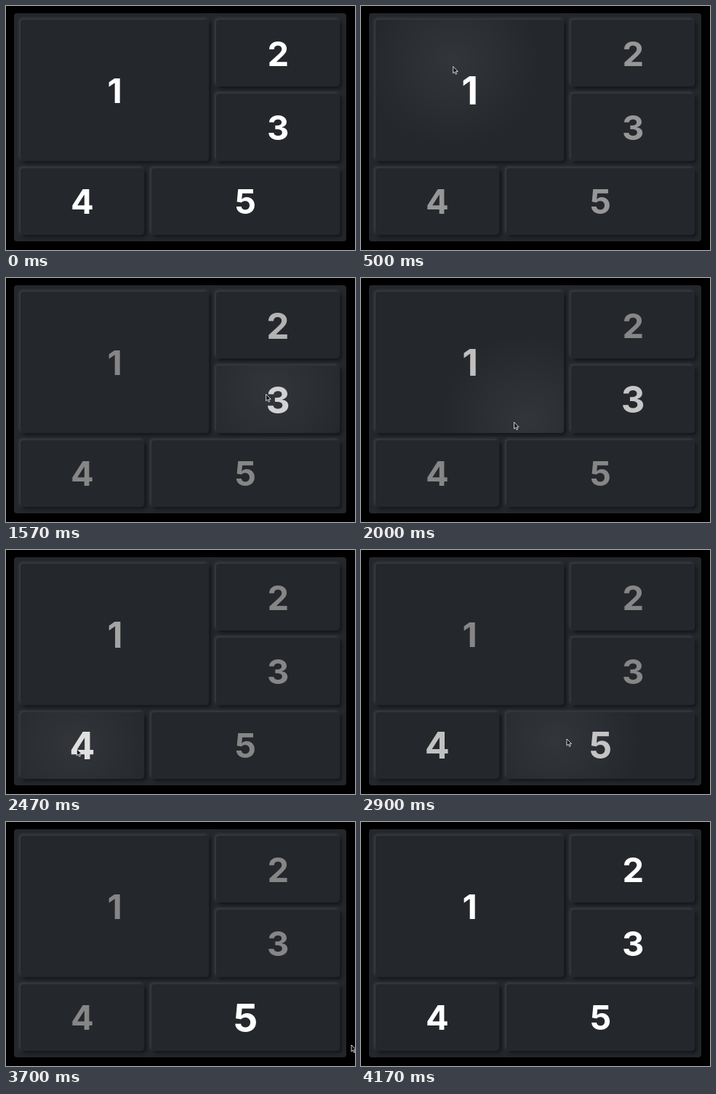
Write an HTML page that moves like this. It is 480 px wide and 337 px high and loops after 4.27 s.

```html
<!DOCTYPE html>
<html lang="en">
<head>
<meta charset="utf-8">
<title>Hover grid</title>
<style>
  html, body { margin: 0; width: 100%; height: 100%; overflow: hidden; background: #000; }
  .stage { position: relative; width: 480px; height: 337px; overflow: hidden; }
  .panel {
    position: absolute; left: 11px; top: 10px; width: 457px; height: 315px;
    box-sizing: border-box; padding: 9px; border-radius: 4px; background: #24272c;
    display: grid; gap: 10px;
    grid-template: repeat(3, 1fr) / repeat(5, 1fr);
  }
  .card {
    position: relative; grid-column: span 2;
    display: flex; align-items: center; justify-content: center;
    border-radius: 4px; background: #24282c;
    box-shadow: -2px -2px 4px rgba(255, 255, 255, .12), 3px 3px 5px rgba(0, 0, 0, .45);
  }
  .card:first-child { grid-area: span 2 / span 3; }
  .card:last-child { grid-column: span 3; }
  .glow {
    position: absolute; inset: 0; border-radius: 4px;
    background: radial-gradient(circle 120px at var(--x, 0) var(--y, 0), rgba(255, 235, 250, .065), rgba(255, 235, 250, 0));
  }
  .num { position: relative; font: 700 47px/1 Inter, sans-serif; }
  .pointer { position: absolute; left: 0; top: 0; overflow: visible; }
</style>
</head>
<body>
<div class="stage">
  <div class="panel"></div>
  <svg class="pointer" width="8" height="12">
    <path d="M0 0V9.2L2.1 7.2L3.5 10.5L5.1 9.8L3.7 6.7H6.6Z" fill="#111" stroke="#fff" stroke-width=".8"/>
  </svg>
</div>
<script>
const LOOP = 4270, FPS = 30, FADE = 500, LAG = 45;
const DIM = 134, GROW = .15, HALF_GAP = 5;

// Pointer key points: time, x, y
const path = [
  [130, 150, 5], [600, 140, 95], [1030, 355, 64], [1570, 357, 161], [2200, 140, 219],
  [2470, 98, 275], [2900, 283, 261], [3700, 475, 308], [3780, 500, 320]
];
const last = path.length - 1;

const panel = document.querySelector('.panel');
const pointer = document.querySelector('.pointer');

panel.innerHTML = [1, 2, 3, 4, 5]
  .map(n => `<div class="card"><div class="glow"></div><span class="num">${n}</span></div>`)
  .join('');
const cards = [...panel.children].map(el => ({
  box: el.getBoundingClientRect(), glow: el.firstChild, num: el.lastChild
}));

const onScreen = t => t >= path[0][0] && t < path[last][0];

// Smooth curve through the key points
function tip(t) {
  if (t <= path[0][0]) return path[0].slice(1);
  if (t >= path[last][0]) return path[last].slice(1);
  const i = path.findIndex(p => p[0] > t) - 1;
  const a = path[i], b = path[i + 1], d = b[0] - a[0], s = (t - a[0]) / d;
  const slope = (k, c) => {
    const p = path[Math.max(k - 1, 0)], n = path[Math.min(k + 1, last)];
    return (n[c] - p[c]) / (n[0] - p[0]) * d;
  };
  return [1, 2].map(c =>
    a[c] + (b[c] - a[c]) * s * s * (3 - 2 * s)
    + slope(i, c) * s * (1 - s) ** 2 - slope(i + 1, c) * s * s * (1 - s));
}

// Index of the card under the pointer, or -1; hover reacts slightly late
function hovered(t) {
  if (!onScreen(t - LAG)) return -1;
  const [x, y] = tip(t - LAG);
  return cards.findIndex(({ box }) =>
    x > box.left - HALF_GAP && x < box.right + HALF_GAP &&
    y > box.top - HALF_GAP && y < box.bottom + HALF_GAP);
}

// Every change of hovered card in one loop: [time, card]
const visits = [];
for (let t = 0, now = -1; t < LOOP; t += 5) {
  const card = hovered(t);
  if (card !== now) visits.push([t, now = card]);
}

// CSS "ease": cubic-bezier(.25, .1, .25, 1)
function ease(p) {
  if (p <= 0) return 0;
  if (p >= 1) return 1;
  const bez = (a, b, s) => 3 * (1 - s) ** 2 * s * a + 3 * (1 - s) * s * s * b + s ** 3;
  let lo = 0, hi = 1;
  for (let k = 0; k < 24; k++) {
    const mid = (lo + hi) / 2;
    if (bez(.25, .25, mid) < p) lo = mid; else hi = mid;
  }
  return bez(.1, 1, lo);
}

// Value at time t of a transition that each visit may redirect
function level(t, goal) {
  let from = goal(-1), to = from, since = 0;
  const at = time => from + (to - from) * ease((time - since) / FADE);
  for (const [time, card] of visits) {
    if (time > t) break;
    const next = +goal(card);
    if (next === to) continue;
    from = at(time);
    to = next;
    since = time;
  }
  return at(t);
}

function draw(t) {
  const active = hovered(t);
  const [gx, gy] = tip(t - LAG);
  cards.forEach(({ box, glow, num }, i) => {
    const size = level(t, card => +(card === i));
    const bright = level(t, card => +(card === i || card < 0));
    const v = Math.round(DIM + (255 - DIM) * bright);
    num.style.color = `rgb(${v},${v},${v})`;
    num.style.transform = `scale(${1 + GROW * size})`;
    glow.style.opacity = +(active === i);
    glow.style.setProperty('--x', `${gx - box.left}px`);
    glow.style.setProperty('--y', `${gy - box.top}px`);
  });
  const [x, y] = tip(t);
  pointer.style.visibility = onScreen(t) ? 'visible' : 'hidden';
  pointer.style.transform = `translate(${x}px,${y}px)`;
}

const origin = performance.now();
function tick() {
  const t = (performance.now() - origin) % LOOP;
  const step = Math.floor(t * FPS / 1000 + .11);
  draw(step * 1000 / FPS);
  requestAnimationFrame(tick);
}
tick();
</script>
</body>
</html>
```
